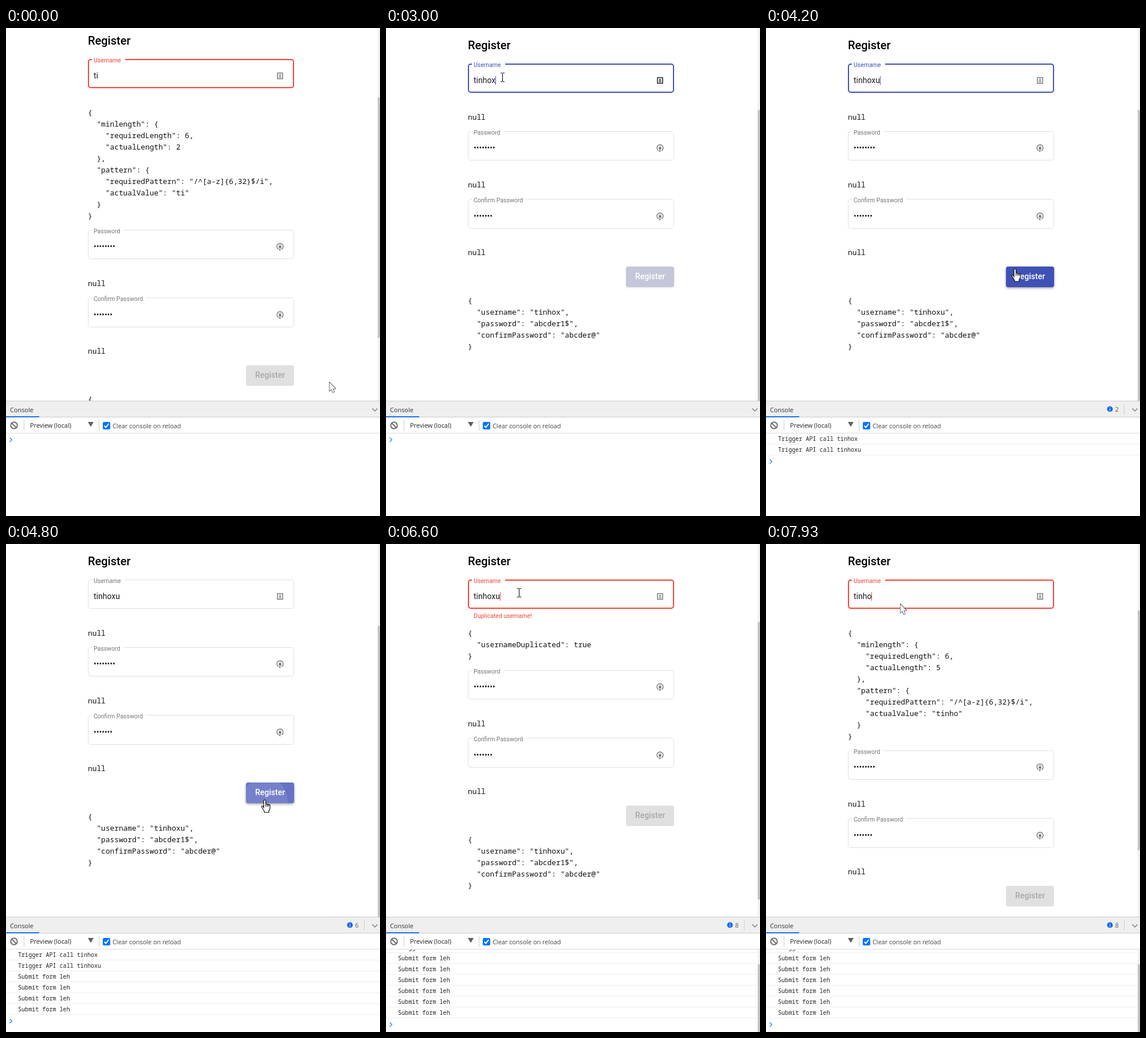
An HTML page with a canvas that plays this animation: 653 px wide and 851 px high, repeating every 8000 ms.

```html
<!DOCTYPE html>
<html lang="en">
<head>
<meta charset="utf-8">
<title>Register form</title>
<style>
html, body { margin: 0; width: 100%; height: 100%; overflow: hidden; background: #fff; }
canvas { display: block; }
</style>
</head>
<body>
<canvas id="stage" width="653" height="851"></canvas>
<script>
const ctx = document.getElementById('stage').getContext('2d');
const LOOP = 8000, LEFT = 143, RIGHT = 503;
const INK = '#1c1c1c', RED = '#f44336', BLUE = '#3f51b5', GREY = '#757575';
const ROBOTO = 'Roboto, sans-serif';
const MONO = '"Noto Sans Mono", monospace';
const UI = '10.9px "Open Sans", sans-serif';
const NAME = 'tinhoxu';

// [time, typed letters]
const TYPING = [[0, 2], [1600, 3], [1800, 4], [1930, 5], [2930, 6], [3730, 7], [7000, 6], [7070, 5]];
const CARET = [[730, 1270], [1600, 2400], [2930, 3400], [3730, 4270], [6600, 7130], [7670, 8000]];
const CALLS = [[3270, 6], [4070, 7]];
const CLICKS = [4400, 4530, 4670, 4800, 4930, 5070];
const MOUSE = [[0, 564, 617], [730, 200, 83], [2930, 200, 83], [3400, 249, 139], [3530, 249, 139],
  [3600, 250, 140], [4330, 452, 446], [4800, 452, 446], [5270, 452, 469], [6130, 452, 469],
  [6600, 232, 85], [7800, 232, 85], [7930, 234, 104], [8000, 234, 104]];

const clamp = v => Math.max(0, Math.min(1, v));
const ramp = (t, a, b) => clamp((t - a) / (b - a));
const smooth = p => p * p * (3 - 2 * p);
const inside = (t, [a, b]) => t >= a && t < b;

function mouseAt(t) {
  let i = 0;
  while (i < MOUSE.length - 2 && MOUSE[i + 1][0] <= t) i++;
  const [a, x, y] = MOUSE[i], [b, x2, y2] = MOUSE[i + 1];
  const p = smooth(ramp(t, a, b));
  return { x: Math.round(x + (x2 - x) * p), y: Math.round(y + (y2 - y) * p) };
}

function text(str, x, y, font, color) {
  ctx.font = font;
  ctx.fillStyle = color;
  ctx.fillText(str, x, y);
}

function rect(x, y, w, h, color) {
  ctx.fillStyle = color;
  ctx.fillRect(x, y, w, h);
}

function poly(points, color, width, close) {
  ctx.beginPath();
  points.forEach(([x, y]) => ctx.lineTo(x, y));
  if (close) ctx.closePath();
  ctx.strokeStyle = color;
  ctx.lineWidth = width;
  ctx.stroke();
}

function disc(x, y, r, color) {
  ctx.beginPath();
  ctx.arc(x, y, r, 0, 7);
  ctx.fillStyle = color;
  ctx.fill();
}

function clipped(x, y, w, h, draw) {
  ctx.save();
  ctx.beginPath();
  ctx.rect(x, y, w, h);
  ctx.clip();
  draw();
  ctx.restore();
}

function json(lines, y) {
  lines.forEach((line, i) => text(line, LEFT, y + i * 20, '12.83px ' + MONO, '#111'));
}

function outline(y, h, gapEnd, width, color) {
  const d = width / 2, l = LEFT + d, r = RIGHT - d, t = y + d, b = y + h - d, c = 5 - d;
  ctx.beginPath();
  ctx.moveTo(gapEnd, t);
  ctx.arcTo(r, t, r, b, c);
  ctx.arcTo(r, b, l, b, c);
  ctx.arcTo(l, b, l, t, c);
  ctx.arcTo(l, t, r, t, c);
  ctx.lineTo(150, t);
  ctx.strokeStyle = color;
  ctx.lineWidth = width;
  ctx.stroke();
}

function cardIcon(y, color) {
  ctx.strokeStyle = color;
  ctx.lineWidth = 1.6;
  ctx.strokeRect(474, y - 5, 9, 10);
  disc(478.5, y - 1.6, 1.3, color);
  rect(476.3, y + 0.2, 4.4, 1.3, color);
  rect(476.3, y + 2.3, 4.4, 1, color);
}

function lockIcon(y) {
  ctx.strokeStyle = '#858585';
  ctx.lineWidth = 1.6;
  ctx.beginPath();
  ctx.arc(478.5, y, 5.4, 2.1, 7.4);
  ctx.stroke();
  rect(476.3, y - 1, 4.4, 3.4, '#757575');
  ctx.lineWidth = 1;
  ctx.beginPath();
  ctx.arc(478.5, y - 1, 1.6, Math.PI, 0);
  ctx.stroke();
  poly([[478.5, y + 2], [478.5, y + 6.5], [476.5, y + 5]], '#757575', 1.2);
}

const overInput = (m, top) => m.x > 153 && m.x < 493 && m.y >= top + 16 && m.y <= top + 40;

function passwordField(label, gapEnd, y, h, count, m) {
  const hover = m.x > LEFT && m.x < RIGHT && m.y > y && m.y < y + h;
  outline(y, h, gapEnd, 1, '#e0e0e0');
  if (hover) outline(y, h, gapEnd, 2, 'rgba(0,0,0,.2)');
  text(label, 153, y + 6, '10.5px ' + ROBOTO, GREY);
  text('•'.repeat(count), 153, y + h - 17, '14px ' + ROBOTO, INK);
  lockIcon(y + h - 22);
}

function button(y, t, enabled) {
  let mix = ramp(t, 2930, 3330) - ramp(t, 5130, 5530);
  if (t >= 7000) mix = 0.17 * (1 - ramp(t, 7070, 7400));
  const tone = [63, 81, 181].map(c => Math.round(224 + (c - 224) * mix));
  const shape = () => {
    ctx.beginPath();
    ctx.roundRect(419, y, 84, 36, 4);
  };
  ctx.save();
  ctx.shadowColor = `rgba(0,0,0,${0.4 * mix})`;
  ctx.shadowBlur = 4;
  ctx.shadowOffsetY = 1.5;
  ctx.fillStyle = `rgb(${tone})`;
  shape();
  ctx.fill();
  ctx.restore();

  ctx.save();
  shape();
  ctx.clip();
  for (const start of CLICKS) {
    const age = t - start;
    if (age < 0 || age > 850) continue;
    const grow = 1 - (1 - clamp(age / 450)) ** 3;
    const alpha = 0.1 * (1 - ramp(age, 450, 850));
    disc(452, y + 31, 62 * grow, `rgba(255,255,255,${alpha})`);
  }
  ctx.restore();
  text('Register', 435, y + 22, '500 14px ' + ROBOTO, enabled ? '#fff' : '#a8a8a8');
}

function page(t, s, m) {
  const { len, dup, invalid, focused } = s;
  const value = NAME.slice(0, len);
  const off = t < 2930 ? -8 : 0;
  const top = 62 + off;

  let errors = ['null'];
  if (dup) errors = ['{', '  "usernameDuplicated": true', '}'];
  else if (len < 6) errors = ['{', '  "minlength": {', '    "requiredLength": 6,',
    '    "actualLength": ' + len, '  },', '  "pattern": {',
    '    "requiredPattern": "/^[a-z]{6,32}$/i",', `    "actualValue": "${value}"`, '  }', '}'];

  text('Register', LEFT, 37 + off, '500 20px ' + ROBOTO, '#000');
  const strong = invalid || focused;
  const color = invalid ? RED : focused ? BLUE : '#e0e0e0';
  outline(top, 51, 208, strong ? 2 : 1, color);
  text('Username', 153, top + 6, '10.5px ' + ROBOTO, strong ? color : GREY);
  text(value, 153, top + 34, '14px ' + ROBOTO, INK);
  if (CARET.some(span => inside(t, span))) {
    const x = 153 + Math.round(ctx.measureText(value).width);
    rect(x, top + 22, 1, 15, color);
  }
  cardIcon(top + 29.5, inside(t, [670, 3070]) ? '#2b2b2b' : '#808080');
  if (dup) {
    const p = smooth(ramp(t, 5200, 5530));
    ctx.globalAlpha = p;
    text('Duplicated username!', 153, top + 67 - 6 * (1 - p), '10.5px ' + ROBOTO, RED);
    ctx.globalAlpha = 1;
  }
  json(errors, 160 + off);

  const y = 180 + off + (errors.length - 1) * 20;
  passwordField('Password', 205, y, 51, 8, m);
  json(['null'], y + 98);
  passwordField('Confirm Password', 245, y + 118, 52, 7, m);
  json(['null'], y + 216);
  button(y + 236, t, !invalid);
  json(['{', `  "username": "${value}",`, '  "password": "abcder1$",',
    '  "confirmPassword": "abcder@"', '}'], y + 300);

  let thumb = [143, 507];
  if (dup) thumb = [136, 484];
  else if (len < 6) thumb = off ? [121, 419] : [116, 418];
  rect(649, 0, 4, 650, '#f0f0f0');
  rect(649, thumb[0], 4, thumb[1], '#c4c4c4');
  return { top, y };
}

function logs(t) {
  const calls = CALLS.filter(c => c[0] <= t).map(c => 'Trigger API call ' + NAME.slice(0, c[1]));
  return calls.concat(CLICKS.filter(c => c <= t).map(() => 'Submit form leh'));
}

function panel(rows) {
  rect(0, 650, 653, 201, '#fff');
  rect(0, 650, 653, 29, '#efefef');
  rect(0, 650, 653, 1, '#cbcbcb');
  rect(0, 678, 653, 1, '#cbcbcb');
  rect(0, 677, 58, 2, '#1a73e8');
  rect(0, 706, 653, 1, '#dcdcdc');
  text('Console', 7, 670, UI, '#333');
  poly([[639.5, 663.5], [644, 668], [648.5, 663.5]], '#6e6e6e', 1.2);

  ctx.beginPath();
  ctx.arc(14, 693, 5.7, 0, 7);
  ctx.strokeStyle = '#6e6e6e';
  ctx.lineWidth = 2;
  ctx.stroke();
  poly([[10, 689], [18, 697]], '#6e6e6e', 2);
  rect(31, 684, 1, 18, '#ccc');
  rect(162, 684, 1, 18, '#ccc');
  text('Preview (local)', 42, 697, UI, '#222');
  ctx.beginPath();
  ctx.moveTo(143, 687);
  ctx.lineTo(153, 687);
  ctx.lineTo(148, 695.5);
  ctx.fillStyle = '#5f5f5f';
  ctx.fill();
  ctx.beginPath();
  ctx.roundRect(169, 687, 13, 13, 2);
  ctx.fillStyle = '#0075ff';
  ctx.fill();
  poly([[171.8, 693.8], [174.3, 696.5], [179.3, 690]], '#fff', 2);
  text('Clear console on reload', 186, 698, UI, '#444');

  if (rows.length) {
    disc(600.5, 664.5, 5, '#1a6ce8');
    rect(600, 664, 1, 3.5, '#fff');
    rect(600, 661.5, 1, 1.3, '#fff');
    text(rows.length, 609.5, 669, UI, '#5a5a5a');
    rect(625, 656, 1, 18, '#ccc');
  }

  const n = rows.length, scroll = Math.max(0, 13 + 19 * (n - 7));
  clipped(0, 707, 653, 144, () => {
    rows.forEach((row, i) => {
      const y = 707 + i * 19 - scroll;
      text(row, 21, y + 13, '10.08px ' + MONO, '#222');
      rect(0, y + 18, 653, 1, '#ededed');
    });
    const y = 718 + n * 19 - scroll;
    poly([[6.5, y - 3.7], [10.3, y], [6.5, y + 3.7]], '#367cf1', 1.3);
    if (scroll) {
      const h = Math.round(144 * 144 / (144 + scroll));
      rect(649, 707, 4, 144, '#f0f0f0');
      rect(649, 851 - h, 4, h, '#c4c4c4');
    }
  });
}

const ARROW = [[0.5, 0.5], [0.5, 16.2], [4.1, 12.8], [6.7, 18.4], [9, 17.4], [6.5, 12], [11.4, 12]];

function cursor(m, kind) {
  ctx.save();
  ctx.translate(m.x, m.y);
  ctx.lineJoin = 'round';
  if (kind === 'beam') {
    rect(0, -7, 1, 14, '#000');
    for (const y of [-8, 7]) {
      rect(-3, y, 3, 1, '#000');
      rect(1, y, 3, 1, '#000');
    }
  } else {
    ctx.fillStyle = '#fff';
    if (kind === 'hand') {
      ctx.beginPath();
      ctx.moveTo(-2, 14);
      ctx.lineTo(-2, 1.5);
      ctx.quadraticCurveTo(0, -1.5, 1.5, 1.5);
      ctx.lineTo(1.5, 7);
      for (const x of [4.2, 6.7, 9]) ctx.quadraticCurveTo(x - 1, 5.5 + x / 5, x, 8 + x / 6);
      ctx.lineTo(9, 15);
      ctx.quadraticCurveTo(8, 18, 7, 19);
      ctx.lineTo(7, 22);
      ctx.lineTo(-1, 22);
      ctx.lineTo(-1, 20);
      ctx.lineTo(-5.5, 13);
      ctx.quadraticCurveTo(-6, 10, -3.5, 11);
      ctx.closePath();
      ctx.fill();
      ctx.strokeStyle = '#000';
      ctx.lineWidth = 1.1;
      ctx.stroke();
      for (const x of [1.5, 4.2, 6.7]) poly([[x, 8], [x, 12]], '#000', 1);
    } else {
      poly(ARROW, '#000', 1.1, true);
      ctx.fill();
    }
  }
  ctx.restore();
}

function draw(ms) {
  const t = Math.round(Math.floor((ms % LOOP + 3.4) / (200 / 3)) * 20 / 3) * 10 % LOOP;
  const len = TYPING.filter(k => k[0] <= t).pop()[1];
  const dup = inside(t, [5130, 7000]);
  const state = { len, dup, invalid: dup || len < 6, focused: t < 4400 || t >= 6600 };
  const m = mouseAt(t);

  rect(0, 0, 653, 851, '#fff');
  let spots;
  clipped(0, 0, 653, 650, () => { spots = page(t, state, m); });
  panel(logs(t));

  const { top, y } = spots;
  let kind = 'arrow';
  if ([top, y, y + 118].some(f => overInput(m, f))) kind = 'beam';
  else if (!state.invalid && m.x > 419 && m.x < RIGHT && m.y > y + 236 && m.y < y + 272) kind = 'hand';
  cursor(m, kind);
}

const begin = performance.now();
function tick() {
  draw(performance.now() - begin);
  requestAnimationFrame(tick);
}
tick();
</script>
</body>
</html>
```
